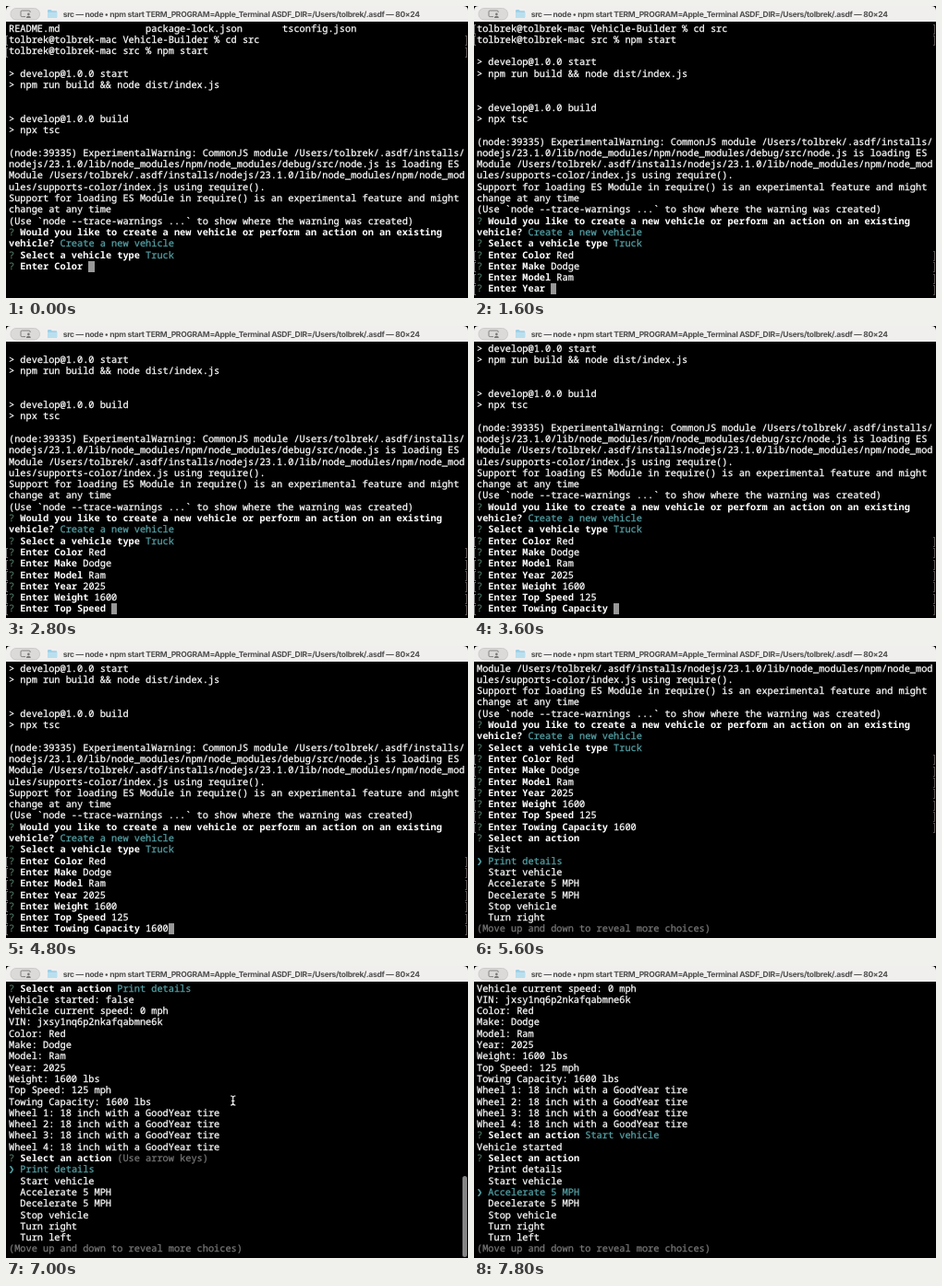
Animation, 500 px wide and 317 px high, one loop 8 s. Source, as an HTML page:

```html
<!DOCTYPE html>
<html lang="en">
<head>
<meta charset="utf-8">
<title>Vehicle builder</title>
<style>
  html, body { margin: 0; width: 100%; height: 100%; overflow: hidden; background: #000; }
  #stage { position: relative; width: 500px; height: 317px; overflow: hidden; background: #000; }
  svg { position: absolute; left: 0; top: 0; }
  .title { font: 700 8.5px Inter, sans-serif; letter-spacing: -.3px; fill: #4f4f4f; text-rendering: geometricPrecision; }
  #rows {
    position: absolute; left: 0; top: 18.6px; width: 500px;
    font: 500 10.29px/12.31px "Noto Sans Mono", "DejaVu Sans Mono", monospace;
    color: #fff; white-space: pre; text-rendering: geometricPrecision;
    font-variant-ligatures: none; -webkit-text-stroke: .25px;
  }
  .row { position: relative; height: 12.31px; padding-left: 3px; }
  .mark::before, .mark::after {
    content: ""; position: absolute; top: 1.5px; width: 1px; height: 9px; border: 1px solid #777;
  }
  .mark::before { left: 0; border-right: 0; }
  .mark::after { left: 497px; border-left: 0; border-color: #5c5555; }
  b { font-weight: 700; -webkit-text-stroke: 0; }
  .q { color: #4a705f; }
  .c { color: #55a3a8; }
  .d { color: #787878; }
  .cur { display: inline-block; width: 6.2px; height: 12px; background: #989898; vertical-align: top; }
  #thumb { position: absolute; left: 494px; width: 4.5px; height: 88px; border-radius: 3px; background: #858585; }
</style>
</head>
<body>
<div id="stage">
  <div id="rows"></div>
  <div id="thumb"></div>
  <svg width="500" height="317" viewBox="0 0 500 317">
    <path d="M0 17V5Q0 0 5 0H495Q500 0 500 5V17Z" fill="#f1efee"/>
    <rect x="5" y="2.5" width="31.5" height="12.5" rx="6" fill="#dcdad9" stroke="#c6c4c3" stroke-width=".8"/>
    <path d="M21 11.6H17.2Q16 11.6 16 10.4V6.2Q16 5 17.2 5H25Q26.2 5 26.2 6.2V7" fill="none" stroke="#777" stroke-width=".9"/>
    <g fill="#777">
      <circle cx="24.4" cy="8.9" r="1.3"/>
      <path d="M21.9 12.9Q22 10.7 24.4 10.7T26.9 12.9Z"/>
    </g>
    <path d="M45 5.2Q45 4 46.2 4H48.6L49.8 5.2H54Q55.2 5.2 55.2 6.4V12Q55.2 13 54.2 13H46Q45 13 45 12Z" fill="#9ccfe6"/>
    <path d="M45 6.8H55.2V12Q55.2 13 54.2 13H46Q45 13 45 12Z" fill="#b9dfee"/>
    <text class="title" x="254.7" y="11.8" text-anchor="middle">src — node • npm start TERM_PROGRAM=Apple_Terminal ASDF_DIR=/Users/tolbrek/.asdf — 80×24</text>
    <path id="pointer" d="M243.5 141Q245.7 141 245.7 143V149Q245.7 151 243.5 151M248 141Q245.7 141 245.7 143M245.7 149Q245.7 151 248 151M244.5 146.5H247"
      fill="none" stroke="#fff" stroke-width="1.1" stroke-linecap="round"/>
  </svg>
</div>
<script>
const LOOP = 8000, ROWS = 24, BUFFER = 81, TRACK_END = 316, TRACK = 299, THUMB = 88;
const $ = id => document.getElementById(id);

const row = (html, marked) => `<div class="row${marked ? ' mark' : ''}">${html}</div>`;
const span = (cls, text) => `<span class="${cls}">${text}</span>`;
const ask = (text, rest = '') => `${span('q', '?')} <b>${text}</b> ${rest}`;
const plain = text => text.split('\n').map(line => row(line));

const head = [
  row('README.md'.padEnd(24) + 'package-lock.json'.padEnd(24) + 'tsconfig.json'),
  row('tolbrek@tolbrek-mac Vehicle-Builder % cd src', true),
  row('tolbrek@tolbrek-mac src % npm start', true),
  ...plain(`
&gt; develop@1.0.0 start
&gt; npm run build &amp;&amp; node dist/index.js


&gt; develop@1.0.0 build
&gt; npx tsc

(node:39335) ExperimentalWarning: CommonJS module /Users/tolbrek/.asdf/installs/
nodejs/23.1.0/lib/node_modules/npm/node_modules/debug/src/node.js is loading ES
Module /Users/tolbrek/.asdf/installs/nodejs/23.1.0/lib/node_modules/npm/node_mod
ules/supports-color/index.js using require().
Support for loading ES Module in require() is an experimental feature and might
change at any time
(Use \`node --trace-warnings ...\` to show where the warning was created)`),
  row(ask('Would you like to create a new vehicle or perform an action on an existing')),
  row('<b>vehicle?</b> ' + span('c', 'Create a new vehicle')),
  row(ask('Select a vehicle type', span('c', 'Truck')))
];

const fields = [['Color', 'Red'], ['Make', 'Dodge'], ['Model', 'Ram'], ['Year', '2025'],
  ['Weight', '1600'], ['Top Speed', '125'], ['Towing Capacity', '1600']];
const filled = n => fields.slice(0, n).map(([name, value]) => row(ask('Enter ' + name, value), true));

const details = plain(`Vehicle started: false
Vehicle current speed: 0 mph
VIN: jxsy1nq6p2nkafqabmne6k
Color: Red
Make: Dodge
Model: Ram
Year: 2025
Weight: 1600 lbs
Top Speed: 125 mph
Towing Capacity: 1600 lbs
` + [1, 2, 3, 4].map(n => `Wheel ${n}: 18 inch with a GoodYear tire`).join('\n'));

const choices = ['Exit', 'Print details', 'Start vehicle', 'Accelerate 5 MPH', 'Decelerate 5 MPH',
  'Stop vehicle', 'Turn right', 'Turn left'];
const chosen = name => row(ask('Select an action', span('c', name)));
const menu = (first, picked, hint) => [
  row(ask('Select an action', hint ? span('d', '(Use arrow keys)') : '')),
  ...choices.slice(first, first + 7).map((name, i) =>
    row(first + i === picked ? span('c', '❯ ' + name) : '  ' + name)),
  row(span('d', '(Move up and down to reveal more choices)'))
];

// Each screen is the full list of lines so far.
const typing = (n, count) => [...head, ...filled(n),
  row(ask('Enter ' + fields[n][0], fields[n][1].slice(0, count) + span('cur', '')), n > 0)];
const built = [...head, ...filled(7)];
const printed = [...built, chosen('Print details'), ...details];
const started = [...printed, chosen('Start vehicle'), row('Vehicle started')];
const fresh = [...printed, ...menu(1, 1, true)];

// time, lines, lines scrolled back (when the scrollbar shows)
const steps = [
  [0, typing(0, 0)], [400, typing(0, 2)], [600, typing(1, 0)], [800, typing(1, 2)],
  [1000, typing(1, 4)], [1200, typing(2, 0)], [1400, typing(2, 2)],
  [1600, typing(3, 0)], [1800, typing(3, 2)], [2000, typing(3, 4)],
  [2200, typing(4, 0)], [2400, typing(4, 2)], [2600, typing(4, 4)],
  [2800, typing(5, 0)], [3000, typing(5, 1)], [3200, typing(5, 2)], [3400, typing(5, 3)],
  [3600, typing(6, 0)], [3800, typing(6, 1)], [4000, typing(6, 2)], [4200, typing(6, 4)],
  [5000, [...built, ...menu(1, 1, true)]],
  [5600, [...built, ...menu(0, 1)]],
  [6000, fresh], [6200, fresh, 1], [6400, fresh, 4], [6600, fresh, 5], [6800, fresh, 3], [7000, fresh, 0],
  [7200, [...printed, ...menu(1, 2)], 0],
  [7400, [...started, ...menu(1, 1, true)]],
  [7800, [...started, ...menu(1, 3)]]
];

let shown = -1;
function show(index) {
  const [, lines, back] = steps[index];
  const end = lines.length - (back || 0);
  const scrolling = back !== undefined;
  $('rows').innerHTML = lines.slice(Math.max(0, end - ROWS), end).join('');
  $('thumb').style.display = $('pointer').style.display = scrolling ? '' : 'none';
  if (scrolling) $('thumb').style.top = TRACK_END - THUMB - back * TRACK / BUFFER + 'px';
  shown = index;
}

function tick() {
  const t = performance.now() % LOOP;
  const index = steps.findLastIndex(step => step[0] <= t);
  if (index !== shown) show(index);
  requestAnimationFrame(tick);
}
tick();
</script>
</body>
</html>
```
